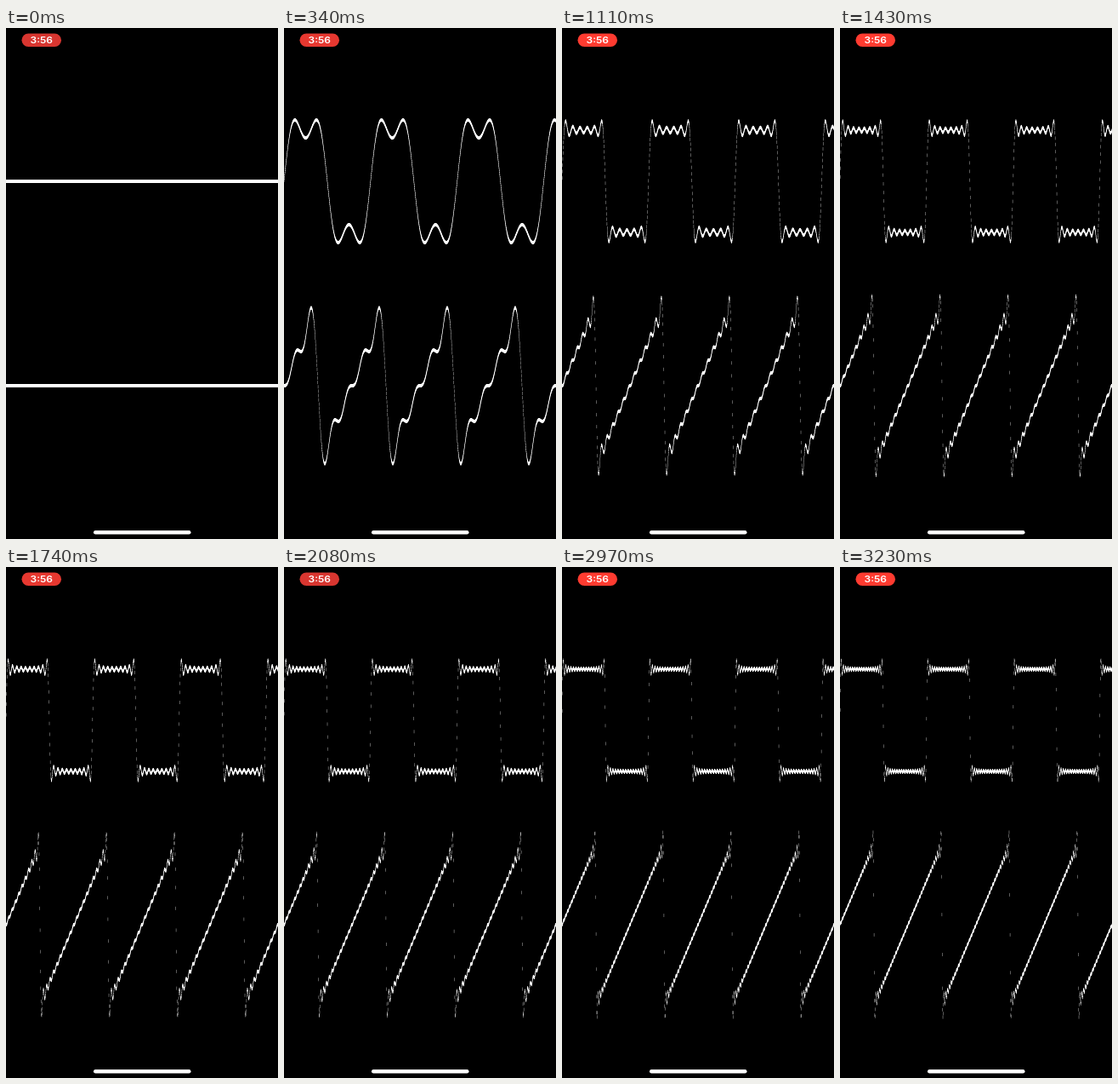
Recreate the animation shown at these times as an HTML page with a canvas. Size 320 px wide and 600 px high, loop 3260 ms.

```html
<!DOCTYPE html>
<html lang="en">
<head>
<meta charset="utf-8">
<title>Fourier waves</title>
<style>
  html, body { margin: 0; width: 100%; height: 100%; overflow: hidden; background: #000; }
  canvas { display: block; }
</style>
</head>
<body>
<canvas id="stage" width="320" height="600"></canvas>
<script>
const ctx = document.getElementById('stage').getContext('2d');
const LOOP = 3260, HOLD = 80, STEP = 86.5;
const SAMPLES = 1170, DX = 320 / SAMPLES;
const DASH_W = 0.36, DASH_H = 4;
const TAU = 2 * Math.PI;

// Partial sums with harmonics 1..n
function square(phase, n) {
  let sum = 0;
  for (let k = 1; k <= n; k += 2) sum += Math.sin(k * phase) / k;
  return sum;
}

function saw(phase, n) {
  let sum = 0;
  for (let k = 1; k <= n; k++) sum += (k % 2 ? 1 : -1) * Math.sin(k * phase) / k;
  return sum;
}

// One thin upright dash per sample; overlapping dashes add up to white
function plot(wave, n, centre, size, period) {
  for (let i = 0; i < SAMPLES; i++) {
    const x = (i + 0.5) * DX;
    const y = centre - size * wave(TAU * x / period, n);
    ctx.fillRect(x - DASH_W / 2, y - DASH_H / 2, DASH_W, DASH_H);
  }
}

function pill(x, y, w, h, colour) {
  ctx.fillStyle = colour;
  ctx.beginPath();
  ctx.roundRect(x, y, w, h, h / 2);
  ctx.fill();
}

function statusBar(t) {
  const glow = Math.min(1, 0.8 * (1 - Math.cos(TAU * t / 2080)));
  pill(18.5, 6.5, 46.5, 15.5, `rgb(${216 + 39 * glow}, ${54 + 5 * glow}, 48)`);
  ctx.save();
  ctx.translate(41.8, 18.3);
  ctx.scale(1, 0.87); // the whole screen is slightly squashed
  ctx.font = '600 12px Inter, sans-serif';
  ctx.textAlign = 'center';
  ctx.fillStyle = '#fff';
  ctx.fillText('3:56', 0, 0);
  ctx.restore();
}

function draw() {
  const t = performance.now() % LOOP;
  const n = t < HOLD ? 0 : 1 + Math.floor((t - HOLD) / STEP);
  ctx.fillStyle = '#000';
  ctx.fillRect(0, 0, 320, 600);

  ctx.globalCompositeOperation = 'lighter';
  ctx.fillStyle = '#fff';
  plot(square, n, 180, 240 / Math.PI, 320 / Math.PI);
  plot(saw, n, 420, 60, 80);
  ctx.globalCompositeOperation = 'source-over';

  statusBar(t);
  pill(103, 590, 114.5, 4.5, '#fff');
  requestAnimationFrame(draw);
}
draw();
</script>
</body>
</html>
```
